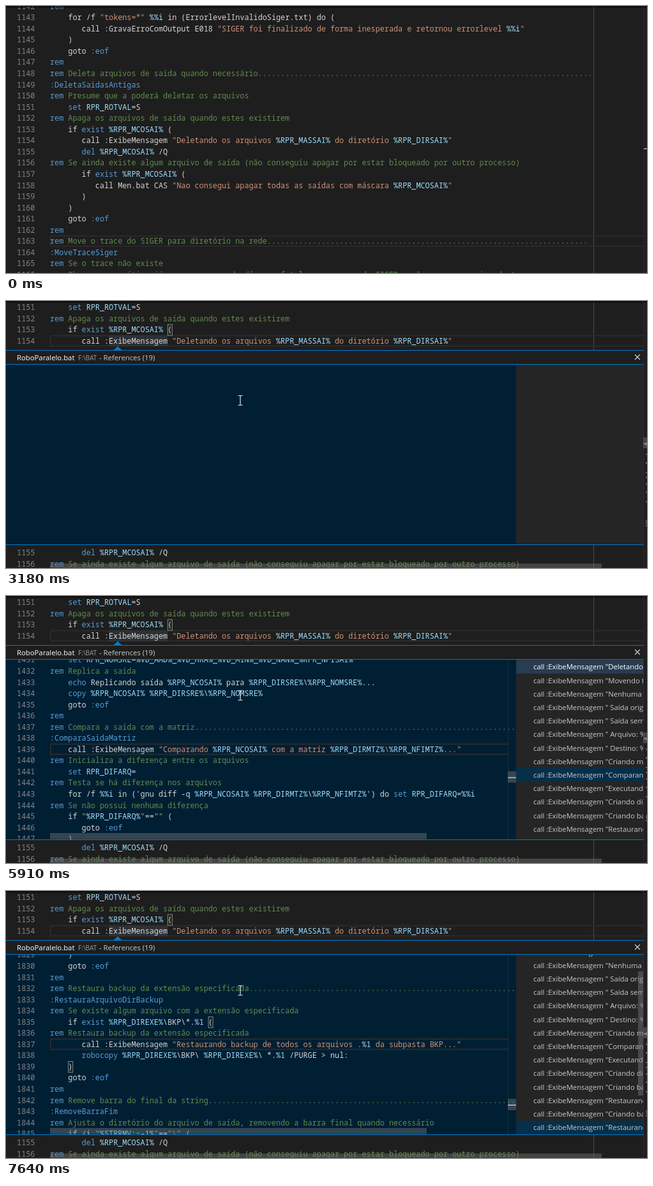
An HTML page that plays this animation: 1004x419 px, repeating every 8000 ms.

```html
<!DOCTYPE html>
<html lang="pt">
<head>
<meta charset="utf-8">
<style>
html, body { margin: 0; width: 100%; height: 100%; overflow: hidden; background: #1e1e1e; }
svg { display: block; width: 1004px; height: 419px; }
text { white-space: pre; fill: #d4d4d4; }
.code { font: 500 11.8px "Noto Sans Mono", "DejaVu Sans Mono", monospace; }
.ui { font: 500 11.3px "Open Sans", "Noto Sans", sans-serif; }
.num { fill: #858585; text-anchor: end; }
.key { fill: #569cd6; }
.rem { fill: #608b4e; }
.str { fill: #ce9178; }
.var { fill: #9cdcfe; }
.bar { fill: #797979; fill-opacity: .42; }
.lineBox { fill: none; stroke: #2c2a2a; stroke-width: 1.8; }
.bracket { fill: #006400; fill-opacity: .1; stroke: #888; }
</style>
</head>
<body>
<svg id="stage" viewBox="0 0 1004 419">
  <defs>
    <clipPath id="bodyClip"><rect y="100" width="799" height="282"/></clipPath>
    <clipPath id="listClip"><rect x="799" y="100" width="199" height="282"/></clipPath>
    <linearGradient id="shade" x2="0" y2="1">
      <stop stop-color="#000" stop-opacity=".75"/><stop offset="1" stop-color="#000" stop-opacity="0"/>
    </linearGradient>
  </defs>
</svg>
<script>
const LOOP = 8000, CHAR = 7.08, PITCH = 17.55, LEFT = 69, ROW = 21.2;
const stage = document.getElementById("stage");
const code = new Map();

function block(first, source) {
  source.split("\n").slice(1, -1).forEach((line, i) => {
    const dots = /^(.*)~(\d+)$/.exec(line);
    code.set(first + i, dots ? dots[1].padEnd(+dots[2], ".") : line);
  });
}

block(1142, String.raw`
rem
    for /f "tokens=*" %%i in (ErrorlevelInvalidoSiger.txt) do (
       call :GravaErroComOutput E018 "SIGER foi finalizado de forma inesperada e retornou errorlevel %%i"
    )
    goto :eof
rem
rem Deleta arquivos de saída quando necessário~120
:DeletaSaidasAntigas
rem Presume que a poderá deletar os arquivos
    set RPR_ROTVAL=S
rem Apaga os arquivos de saída quando estes existirem
    if exist %RPR_MCOSAI% (
       call :ExibeMensagem "Deletando os arquivos %RPR_MASSAI% do diretório %RPR_DIRSAI%"
       del %RPR_MCOSAI% /Q
rem Se ainda existe algum arquivo de saída (não conseguiu apagar por estar bloqueado por outro processo)
       if exist %RPR_MCOSAI% (
          call Men.bat CAS "Nao consegui apagar todas as saídas com máscara %RPR_MCOSAI%"
       )
    )
    goto :eof
rem
rem Move o trace do SIGER para diretório na rede~119
:MoveTraceSiger
rem Se o trace não existe
rem Observa na crítica já que um erro pode dá erro fatal no processo do SIGER e não gera o arquivo de trace
`);
block(1310, String.raw`
       call Men.bat Dorvel "Não foi possível montar o nome original da saída! Param: %1"
       goto :eof
    )
rem Nome final do arquivo de saída e de sua respectiva matriz
    set RPR_NFISAI=%RPR_PRESAI%_%RPR_SAISID%
    set RPR_NFIMTZ=MTZ_%RPR_NFISAI%
rem Exibe informações da saída atual
    call :ExibeMensagem "   Saída original: %RPR_SAISIG%"
    call :ExibeMensagem "     Saída sem ID: %RPR_SAISID%"
    call :ExibeMensagem "          Arquivo: %RPR_NFISAI%"
    call :ExibeMensagem "          Destino: %RPR_RAIROB%\"
rem Se não conseguiu encontrar a saída
    if not exist %RPR_DIRSAI%\%RPR_SAISIG% (
       call Men.bat Dorvel "Não foi possível encontrar a saída %RPR_DIRSAI%\%RPR_SAISIG%. Param: %1"
       goto :eof
    )
rem Se remove antens das saídas do SIGER
`);
block(1431, String.raw`
    set RPR_NOMSRE=%VD_AMD%_%VD_HRA%_%VD_MIN%_%VD_NAN%_%RPR_NFISAI%
rem Replica a saída
    echo Replicando saída %RPR_NCOSAI% para %RPR_DIRSRE%\%RPR_NOMSRE%...
    copy %RPR_NCOSAI% %RPR_DIRSRE%\%RPR_NOMSRE%
    goto :eof
rem
rem Compara a saída com a matriz~120
:ComparaSaidaMatriz
    call :ExibeMensagem "Comparando %RPR_NCOSAI% com a matriz %RPR_DIRMTZ%\%RPR_NFIMTZ%..."
rem Inicializa a diferença entre os arquivos
    set RPR_DIFARQ=
rem Testa se há diferença nos arquivos
    for /f %%i in ('gnu diff -q %RPR_NCOSAI% %RPR_DIRMTZ%\%RPR_NFIMTZ%') do set RPR_DIFARQ=%%i
rem Se não possui nenhuma diferença
    if "%RPR_DIFARQ%"=="" (
       goto :eof
    )
`);
block(1791, String.raw`
    )
    goto :eof
rem
rem Restaura backup da base de dados para todas as extensões necessárias~120
:RestauraBackupBase
rem Se for c-tree
    if "%RPR_BASCTR%"=="S" (
rem Restaura backup da base de dados c-tree testando o errorlevel retornado
       call :ExibeMensagem "Restaurando backup da base c-tree em %RPR_DIRDAD%..."
       call :EspelhaBaseTestandoErrorlevel %RPR_UNIRED%\RECHINT\ctree.conf %RPR_RAICTR% %RPR_DIOCTR%\BKP
       goto :eof
    )
rem Restaura backup de todos os arquivos da base de dados
    for %%a in (dad idx) do (
rem Restaura backup da extensão especificada
       call :RestauraArquivoDirBackup %%a
    )
`);
block(1829, String.raw`
    )
    goto :eof
rem
rem Restaura backup da extensão especificada~120
:RestauraArquivoDirBackup
rem Se existe algum arquivo com a extensão especificada
    if exist %RPR_DIREXE%\BKP\*.%1 (
rem Restaura backup da extensão especificada
       call :ExibeMensagem "Restaurando backup de todos os arquivos .%1 da subpasta BKP..."
       robocopy %RPR_DIREXE%\BKP\ %RPR_DIREXE%\ *.%1 /PURGE > nul:
    )
    goto :eof
rem
rem Remove barra do final da string~120
:RemoveBarraFim
rem Ajusta o diretório do arquivo de saída, removendo a barra final quando necessário
    if /i "%STRRMV:~-1%"=="\" (
`);

// Routine shape for the parts of the file that only flash by
const routine = msg => [
  "    )", "    goto :eof", "rem", "rem Prepara os arquivos da etapa".padEnd(120, "."), ":PreparaEtapa",
  "rem Se o diretório ainda não existe", "    if not exist %RPR_DIRSAI% (", "rem Informa a etapa atual",
  `       call :ExibeMensagem "${msg} %RPR_NFISAI%..."`, "       copy %RPR_NCOSAI% %RPR_DIRSAI%", "    )",
  "    goto :eof", "rem", "rem Testa o retorno da execução".padEnd(120, "."), ":TestaRetorno",
  "rem Se retornou algum erro", "    set RPR_RETORN=%1"];

// start time, line, message
const refs = [
  [0, 1154, "Deletando os arquivos"], [4520, 1169, "Movendo trace"], [4670, 1247, "Nenhuma saída"],
  [4900, 1317, " Saída original:"], [5130, 1318, " Saída sem ID:"], [5300, 1319, " Arquivo: %RPR_NFISAI%"],
  [5530, 1320, " Destino: %RPR_RAIROB%"], [5770, 1398, "Criando matriz"], [5910, 1439, "Comparando"],
  [6140, 1492, "Executando"], [6370, 1561, "Criando diretório"], [6540, 1640, "Criando backup"],
  [6780, 1799, "Restaurando backup"], [7020, 1816, "Criando backup"], [7570, 1837, "Restaurando backup"]];
// lines of the brackets around a reference
const bracketPairs = { 1154: [1153, 1160], 1799: [1797, 1802], 1837: [1835, 1839] };

function el(tag, attrs, parent = stage, content) {
  const node = document.createElementNS("http://www.w3.org/2000/svg", tag);
  for (const k in attrs) node.setAttribute(k, attrs[k]);
  if (content !== undefined) node.textContent = content;
  return parent.appendChild(node);
}
const rect = (x, y, width, height, attrs, parent) => el("rect", { x, y, width, height, ...attrs }, parent);
const group = (parent, attrs = {}) => el("g", attrs, parent);
const show = (node, on) => node.setAttribute("opacity", +on);
const clamp = v => Math.max(0, Math.min(1, v));
const colX = col => LEFT + col * CHAR;

function tokens(line) {
  if (line.startsWith("rem")) return [["key", "rem"], ["rem", line.slice(3)]];
  if (line.startsWith(":")) return [["key", line]];
  const pattern = /(%%\w|%[\w:~-]+%|%\d|(?<=\bset )\w+)|(\b(?:set|exist|not|del|echo|copy|robocopy)\b|:eof)|(")/g;
  const out = [];
  let quoted = false, last = 0;
  for (const m of line.matchAll(pattern)) {
    out.push([quoted ? "str" : "", line.slice(last, m.index)]);
    out.push([m[1] ? "var" : m[3] || quoted ? "str" : "key", m[0]]);
    if (m[3]) quoted = !quoted;
    last = m.index + m[0].length;
  }
  out.push([quoted ? "str" : "", line.slice(last)]);
  return out;
}

function drawLine(parent, n, line, center) {
  const y = center + 4.3;
  el("text", { x: 45.4, y, class: "code num" }, parent, n);
  const text = el("text", { x: LEFT, y, class: "code" }, parent);
  for (const [cls, part] of tokens(line)) if (part) el("tspan", { class: cls }, text, part);
}
// Every matched bracket is the last character of its line
const bracket = (parent, n, center) =>
  rect(colX(code.get(n).length - 1) + .3, Math.round(center - 8.5) + .5, 7, 17, { class: "bracket" }, parent);
const lineBox = (parent, center, right) =>
  el("path", { d: `M${right} ${center - 8}H${LEFT + .9}v16H${right}`, class: "lineBox" }, parent);

// Main editor, split where the peek view opens
const mainY = n => 211 + (n - 1154) * PITCH;
rect(0, 0, 1004, 419, { fill: "#1e1e1e" });
rect(920, 0, 1, 419, { fill: "#4c4c4c" });
const upper = group(), lower = group();
const oldLine = lineBox(lower, mainY(1163), 998);
const newLine = lineBox(upper, mainY(1154), 998);
const word = rect(colX(13), 202.5, 13 * CHAR, 17, { fill: "#2d3135" }, upper);
const openMark = bracket(upper, 1153, mainY(1153));
const closeMark = bracket(lower, 1160, mainY(1160));
for (let n = 1142; n <= 1166; n++) drawLine(n < 1155 ? upper : lower, n, code.get(n), mainY(n));
const caret = rect(174.2, 202.5, 1.8, 17, { fill: "#d8d8d8" }, upper);
const mainBar = rect(LEFT, 412, 864, 7, { class: "bar" });
rect(0, 0, 1004, 4, { fill: "url(#shade)" });

// Peek view
const peek = group();
el("path", { d: "M168 77.5l7-6.5 7 6.5z", fill: "#007acc" }, peek);
rect(0, 77, 999, 306, { fill: "#1e1e1e" }, peek);
rect(0, 77, 999, 1, { fill: "#007acc" }, peek);
el("text", { x: 17, y: 92.7, class: "ui", style: "fill:#fff" }, peek, "RoboParalelo.bat");
el("text", { x: 113, y: 92.7, class: "ui", style: "fill:#999;font-size:10.1px" }, peek, "F:\\BAT");
el("text", { x: 146, y: 92.7, class: "ui", style: "fill:#ccc" }, peek, "- References (19)");
el("path", { d: "M985 84l8 8m0-8l-8 8", stroke: "#ccc", "stroke-width": 1.3 }, peek);
rect(0, 100, 799, 282, { fill: "#001f33" }, peek);
rect(799, 100, 200, 282, { fill: "#252526" }, peek);
const contents = group(peek);
const body = group(contents, { "clip-path": "url(#bodyClip)" });
const peekBar = rect(LEFT, 372, 590, 9.5, { class: "bar" }, contents);
rect(786, 100, 1, 282, { fill: "#10303f" }, contents);
const thumb = group(contents);
rect(786, -9, 13, 18, { class: "bar" }, thumb);
rect(786, 0, 13, 2, { fill: "#9aa4a8" }, thumb);
const list = group(contents, { "clip-path": "url(#listClip)" });
const rows = group(list);
rect(799, 100.5, 200, ROW, { fill: "#283c52" }, rows);
const focusRow = rect(799, 100.5, 200, ROW, { fill: "#062f4a" }, rows);
refs.forEach(([, , msg], i) =>
  el("text", { x: 826, y: 115.3 + i * ROW, class: "ui", style: `fill:${i ? "#c8c8c8" : "#fff"}` }, rows,
    `call :ExibeMensagem "${msg}`));
const listBar = rect(990, 100.5, 8, 195, { class: "bar" }, contents);
rect(0, 99, 999, 1, { fill: "#007acc" }, peek);
rect(0, 382, 999, 1, { fill: "#007acc" }, peek);

// Overview strip of the main editor
rect(998.5, 0, .8, 419, { fill: "#343434" });
const slider = rect(998, 214, 6, 17, { class: "bar" });
rect(999, 223, 5, 2, { fill: "#8a8a8a" });
const marks = group();
for (const [, line] of refs) rect(1002, 222 + (line - 1154) * .19, 2, 1.6, { fill: "#777" }, marks);

const mouse = group();
el("path", { d: "M-3.5-7.5h2.7l.8.8.8-.8h2.7M0-6.7v13.4M-3.5 7.5h2.7l.8-.8.8.8h2.7",
  fill: "none", stroke: "#e4e4e4", "stroke-width": 1.2 }, mouse);

// time, x, y
const path = [[70, 420, 400], [540, 169, 195], [690, 169, 195], [770, 178, 205],
  [1610, 178, 205], [2100, 367, 156]];

function mouseAt(t) {
  let i = 0;
  while (i < path.length - 2 && t >= path[i + 1][0]) i++;
  const [a, b] = [path[i], path[i + 1]];
  const k = clamp((t - a[0]) / (b[0] - a[0])), e = k * k * (3 - 2 * k);
  return [a[1] + (b[1] - a[1]) * e, a[2] + (b[2] - a[2]) * e];
}

let current = -1;
function openRef(index) {
  if (index === current) return;
  current = index;
  const [, line, msg] = refs[index];
  const filler = routine(msg.trim());
  const y = n => 240.5 + (n - line) * PITCH;
  body.replaceChildren();
  lineBox(body, 240.5, 786);
  for (const n of bracketPairs[line] ?? []) bracket(body, n, y(n));
  for (let d = -8; d <= 8; d++) drawLine(body, line + d, code.get(line + d) ?? filler[d + 8], y(line + d));
  thumb.setAttribute("transform", `translate(0 ${Math.round(247.5 + (line - 1154) * .1287)})`);
  const scroll = index > 12 ? (index - 12) * ROW - 5.6 : 0;
  rows.setAttribute("transform", `translate(0 ${-scroll})`);
  focusRow.setAttribute("y", 100.5 + index * ROW);
  show(focusRow, index > 0);
  listBar.setAttribute("y", 100.5 + scroll * .694);
}

function render(t) {
  const open = t >= 3180, clicked = t >= 1080;
  upper.setAttribute("transform", `translate(0 ${open ? -148.5 : 0})`);
  lower.setAttribute("transform", `translate(0 ${open ? 166.5 : 0})`);
  show(oldLine, !clicked);
  for (const node of [newLine, openMark, closeMark]) show(node, clicked);
  for (const node of [word, marks]) show(node, t >= 1380);
  show(caret, (clicked && t < 1610) || (t >= 2100 && t < 2630) || (t >= 3100 && !open));
  const hover = clamp((t - 70) / 230);
  show(mainBar, hover);
  show(slider, hover);
  show(mouse, t >= 70);
  mouse.setAttribute("transform", `translate(${mouseAt(t)})`);
  show(peek, open);
  show(contents, t >= 3330);
  show(peekBar, clamp((t - 3650) / 250));
  show(listBar, t >= 7020 ? 1 : 1 - clamp((t - 3650) / 780));
  openRef(refs.findLastIndex(r => t >= r[0]));
}

const start = performance.now();
(function tick() {
  render((performance.now() - start) % LOOP);
  requestAnimationFrame(tick);
})();
</script>
</body>
</html>
```
